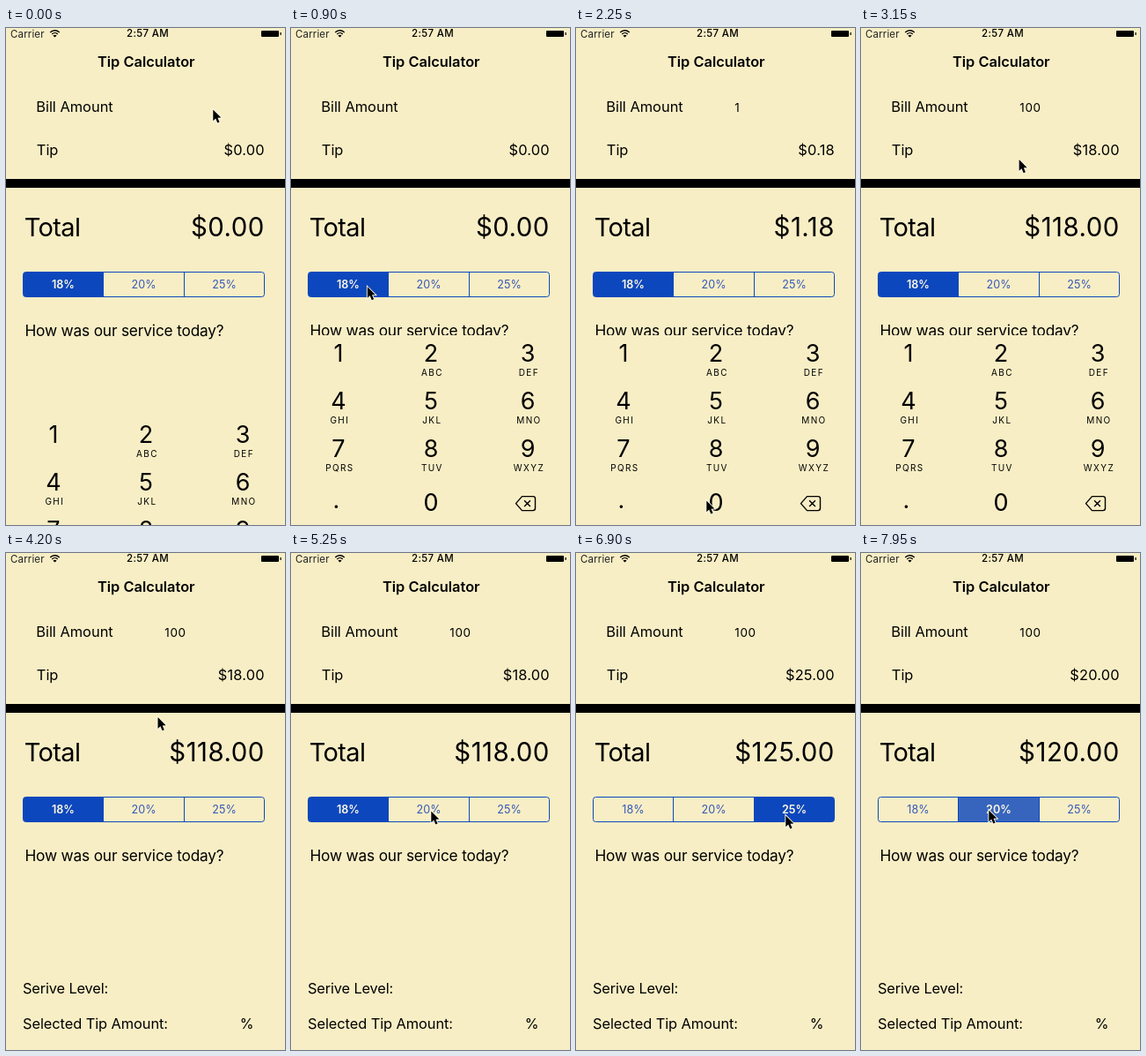
An HTML page with a canvas that plays this animation: 317x563 px, repeating every 8000 ms.

```html
<!DOCTYPE html>
<html lang="en">
<head>
<meta charset="utf-8">
<title>Tip Calculator</title>
<style>
  html, body { margin: 0; width: 100%; height: 100%; overflow: hidden; background: #f8eec5; }
  canvas { display: block; width: 317px; height: 563px; }
</style>
</head>
<body>
<canvas id="stage"></canvas>
<script>
const W = 317, H = 563, LOOP = 8000, STEP = 150;
const CREAM = '#f8eec5', BLUE = '#0d47bd', INK = '#000';
const KEYPAD_TOP = 348, KEYPAD_GONE = 4200;

const canvas = document.getElementById('stage');
const ctx = canvas.getContext('2d');
const dpr = window.devicePixelRatio || 1;
canvas.width = Math.round(W * dpr);
canvas.height = Math.round(H * dpr);

// Pointer moves, each easing out towards its goal
const moves = [
  { at: 0, span: 450, x: 235, y: 88 },
  { at: 750, span: 540, x: 31, y: 369 },
  { at: 1650, span: 540, x: 148, y: 535 },
  { at: 2850, span: 750, x: 184, y: 91 },
  { at: 4050, span: 1020, x: 159, y: 292 },
  { at: 6000, span: 900, x: 238, y: 297 },
  { at: 7050, span: 900, x: 145, y: 291 }
];

// Typed bill and chosen segment, by start time
const bills = [[0, 0], [1500, 1], [2400, 10], [2700, 100]];
const picks = [[0, 0], [5400, 1], [6600, 2], [7950, 1]];
const rates = [18, 20, 25];

const current = (list, t) => list.filter(e => e[0] <= t).pop();
const money = v => '$' + v.toFixed(2);
const easeOut = k => 1 - (1 - Math.min(1, Math.max(0, k))) ** 4;

function pointerAt(t) {
  let x = 235, y = 92;
  for (const m of moves) {
    const k = easeOut((t - m.at) / m.span);
    x += (m.x - x) * k;
    y += (m.y - y) * k;
  }
  return [x, y];
}

function text(str, x, y, size, { align = 'left', weight = 400, color = INK, gap = 0 } = {}) {
  ctx.font = `${weight} ${size}px Inter, Roboto, sans-serif`;
  ctx.letterSpacing = gap + 'px';
  ctx.textAlign = align;
  ctx.fillStyle = color;
  ctx.fillText(str, x, y);
}

function wifi(x, y) {
  ctx.strokeStyle = ctx.fillStyle = INK;
  ctx.lineWidth = 1.4;
  const from = -Math.PI * 0.76, to = -Math.PI * 0.24;
  for (const r of [4.4, 7.2]) {
    ctx.beginPath();
    ctx.arc(x, y, r, from, to);
    ctx.stroke();
  }
  ctx.beginPath();
  ctx.moveTo(x, y + 0.6);
  ctx.arc(x, y + 0.6, 2.8, from, to);
  ctx.fill();
}

function statusBar() {
  text('Carrier', 5, 10.6, 11.5, { gap: 0.15, color: '#222' });
  text('2:57 AM', 161, 10.4, 11.5, { align: 'center', weight: 500, gap: 0.3 });
  wifi(55.5, 10);
  ctx.beginPath();
  ctx.roundRect(290, 3, 20, 7, 1);
  ctx.fill();
  ctx.fillRect(311.5, 5, 1.2, 3);
}

function segments(t) {
  const left = 19.5, top = 276.5, width = 274, height = 28;
  const edge = i => Math.floor(left + i * width / 3) + 0.5;
  const [since, pick] = current(picks, t);
  const fresh = since > 0 && t - since < STEP;

  ctx.save();
  ctx.beginPath();
  ctx.roundRect(left, top, width, height, 3);
  ctx.save();
  ctx.clip();
  ctx.globalAlpha = fresh ? 0.82 : 1;
  ctx.fillStyle = BLUE;
  ctx.fillRect(edge(pick), top, edge(pick + 1) - edge(pick), height);
  ctx.restore();
  for (const i of [1, 2]) {
    ctx.moveTo(edge(i), top);
    ctx.lineTo(edge(i), top + height);
  }
  ctx.strokeStyle = BLUE;
  ctx.lineWidth = 1;
  ctx.stroke();
  ctx.restore();

  rates.forEach((rate, i) => {
    const on = i === pick;
    text(rate + '%', (edge(i) + edge(i + 1)) / 2, 295.2, 12.6, {
      align: 'center', weight: on ? 600 : 400, color: on ? '#fff9e0' : '#3558b9'
    });
  });
}

function form(t) {
  const bill = current(bills, t)[1];
  const tip = bill * rates[current(picks, t)[1]] / 100;

  text('Tip Calculator', 159.3, 44, 16.4, { align: 'center', weight: 600 });
  text('Bill Amount', 34.2, 95.3, 16.4);
  if (bill) text(String(bill), 180.3, 94.8, 13.5, { gap: 0.6 });
  text('Tip', 34.8, 144.4, 16.4);
  text(money(tip), 293.9, 144.4, 16.4, { align: 'right', gap: 0.2 });
  ctx.fillStyle = INK;
  ctx.fillRect(0, 171, W, 10);
  text('Total', 20.7, 236, 29, { gap: -0.6 });
  text(money(bill + tip), 293.9, 236, 29.4, { align: 'right', gap: 0.5 });
  segments(t);
  text('How was our service today?', 21.4, 349.3, 17.3, { gap: -0.18 });
  text('Serive Level:', 19, 499.4, 16.4, { gap: -0.15 });
  text('Selected Tip Amount:', 19, 539.4, 16.4, { gap: -0.08 });
  text('%', 281.5, 539.4, 16, { align: 'right' });
}

function backspace(x, y) {
  ctx.save();
  ctx.translate(x, y);
  ctx.strokeStyle = INK;
  ctx.lineWidth = 1.4;
  ctx.lineJoin = 'round';
  ctx.beginPath();
  ctx.moveTo(-11, 0);
  ctx.lineTo(-4, -8);
  ctx.arcTo(11, -8, 11, 0, 2.5);
  ctx.arcTo(11, 8, -4, 8, 2.5);
  ctx.lineTo(-4, 8);
  ctx.closePath();
  for (const s of [-1, 1]) {
    ctx.moveTo(2 - 3.4, -3.4 * s);
    ctx.lineTo(2 + 3.4, 3.4 * s);
  }
  ctx.stroke();
  ctx.restore();
}

function keypad(t) {
  if (t >= KEYPAD_GONE) return;
  const drop = t < 450 ? 92 * Math.exp(-t / 120) : 0;
  const cols = [54, 159, 269];
  const letters = ['', 'ABC', 'DEF', 'GHI', 'JKL', 'MNO', 'PQRS', 'TUV', 'WXYZ'];

  ctx.save();
  ctx.translate(0, drop);
  ctx.fillStyle = CREAM;
  ctx.fillRect(0, KEYPAD_TOP, W, H);
  letters.forEach((word, i) => {
    const x = cols[i % 3], y = 378.2 + 54 * Math.floor(i / 3);
    text(String(i + 1), x, y, 27, { align: 'center' });
    text(word, x + 1.4, y + 15.6, 10, { align: 'center', gap: 1.4 });
  });
  text('.', 51.5, 544, 27, { align: 'center' });
  text('0', 159, 547.3, 27, { align: 'center' });
  backspace(266.5, 538.6);
  ctx.restore();
}

function pointer(t) {
  const arrow = [[0.3, 0.5], [0.3, 13.3], [3.2, 10.6], [5.3, 15.6], [7.6, 14.6], [5.5, 9.8], [9.4, 9.6]];
  ctx.save();
  ctx.translate(...pointerAt(t));
  ctx.beginPath();
  arrow.forEach(p => ctx.lineTo(...p));
  ctx.closePath();
  ctx.lineWidth = 1.8;
  ctx.strokeStyle = '#fffbe8';
  ctx.stroke();
  ctx.fillStyle = INK;
  ctx.fill();
  ctx.restore();
}

function draw(t) {
  ctx.setTransform(dpr, 0, 0, dpr, 0, 0);
  ctx.fillStyle = CREAM;
  ctx.fillRect(0, 0, W, H);
  statusBar();
  form(t);
  keypad(t);
  pointer(t);
}

const start = performance.now();
function tick() {
  const t = (performance.now() - start) % LOOP;
  draw(Math.floor(t / STEP) * STEP);
  requestAnimationFrame(tick);
}
tick();
</script>
</body>
</html>
```
